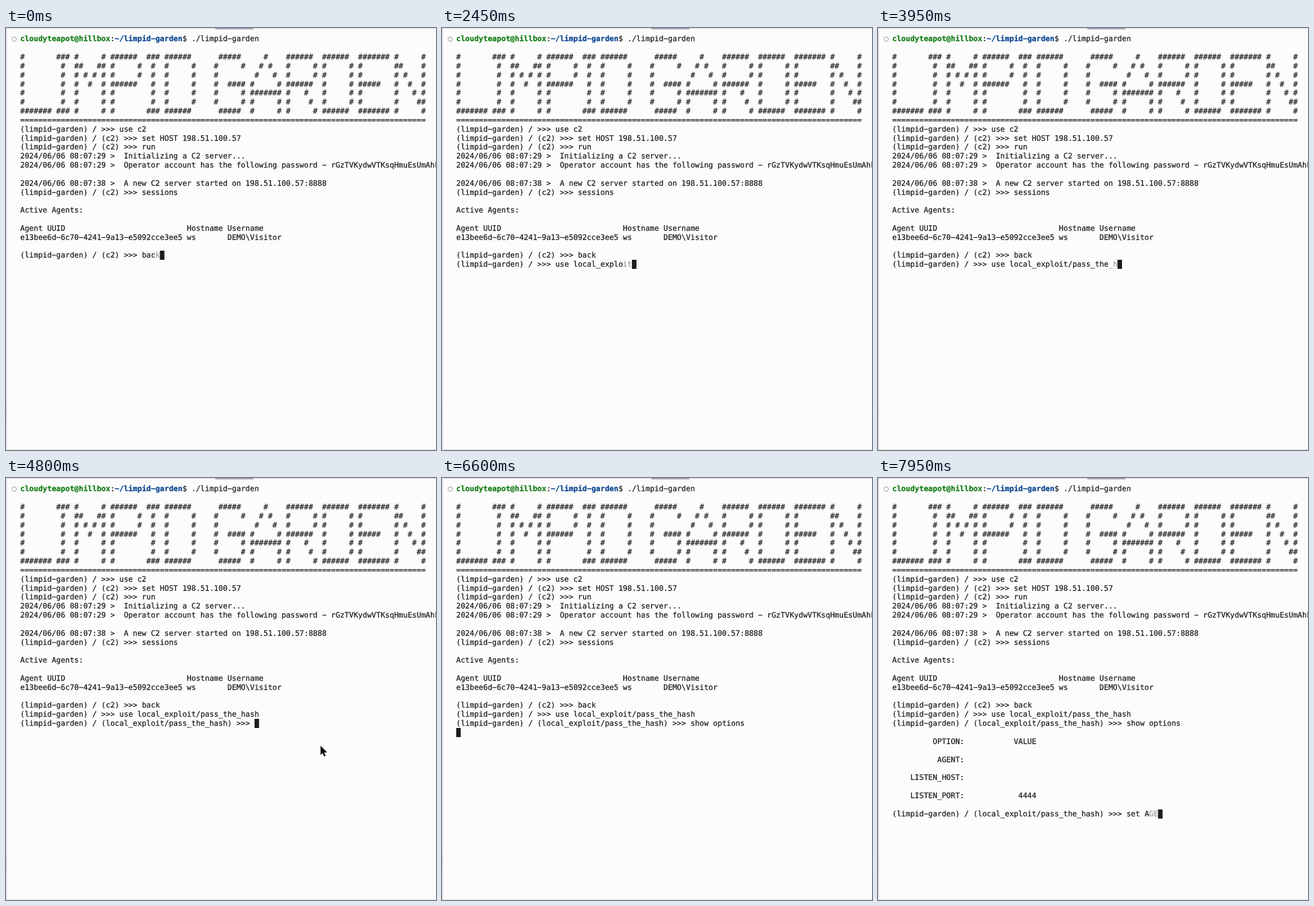
Animation, 756 px wide and 741 px high, one loop 8 s. Source, as an HTML page with a canvas:

```html
<!DOCTYPE html>
<html lang="en">
<head>
<meta charset="utf-8">
<title>Terminal session</title>
<style>
  html, body { margin: 0; width: 100%; height: 100%; overflow: hidden; background: #fcfcfc; }
  canvas { display: block; }
</style>
</head>
<body>
<canvas id="stage" width="756" height="741"></canvas>
<script>
const ctx = document.getElementById("stage").getContext("2d");
const LOOP = 8000, STEP = 50;
const LEFT = 25, BASELINE = 23.8, CELL = 7.922, LINE = 15.84;
const FONT = '13.16px "DejaVu Sans Mono", monospace';
const INK = "#1c1c1e", DIM = "#9b9b9b", GREEN = "#107c10", BLUE = "#0a4490";
const ECHO_DELAY = 125; // a typed key stays dim until it is confirmed

const APP = "limpid-garden", HOST = "198.51.100.57", MODULE = "local_exploit/pass_the_hash";
const prompt = module => `(${APP}) / ${module ? `(${module}) ` : ""}>>> `;
const columnX = col => LEFT + col * CELL;
const baselineY = row => Math.floor(BASELINE + row * LINE);

const GLYPHS = {
  L: "#/#/#/#/#/#/#######",
  I: "###/ # / # / # / # / # /###",
  M: "#     #/##   ##/# # # #/#  #  #/#     #/#     #/#     #",
  P: "######/#     #/#     #/######/#/#/#",
  D: "######/#     #/#     #/#     #/#     #/#     #/######",
  G: " #####/#     #/#/#  ####/#     #/#     #/ #####",
  A: "   #/  # #/ #   #/#     #/#######/#     #/#     #",
  R: "######/#     #/#     #/######/#   #/#    #/#     #",
  E: "#######/#/#/#####/#/#/#######",
  N: "#     #/##    #/# #   #/#  #  #/#   # #/#    ##/#     #",
  "-": "  /  /  /  /  /  /  "
};

const bannerRow = row => [...APP.toUpperCase()].map(letter =>
  GLYPHS[letter].split("/")[row].padEnd(letter === "I" ? 3 : letter === "-" ? 2 : 7)).join(" ");

const history = [
  "", "",
  ...[0, 1, 2, 3, 4, 5, 6].map(bannerRow),
  "=".repeat(90),
  prompt() + "use c2",
  prompt("c2") + "set HOST " + HOST,
  prompt("c2") + "run",
  "2024/06/06 08:07:29 >  Initializing a C2 server...",
  "2024/06/06 08:07:29 >  Operator account has the following password - rGzTVKydwVTKsqHmuEsUmAhkRw",
  "",
  `2024/06/06 08:07:38 >  A new C2 server started on ${HOST}:8888`,
  prompt("c2") + "sessions",
  "",
  "Active Agents:",
  "",
  "Agent UUID".padEnd(37) + "Hostname Username",
  "e13bee6d-6c70-4241-9a13-e5092cce3ee5 ws       DEMO\\Visitor"
];

const options = [["OPTION", "VALUE"], ["AGENT", ""], ["LISTEN_HOST", ""], ["LISTEN_PORT", "4444"]];
const OPTIONS_ROW = 28, OPTIONS_AT = 6800;

// caretAt: caret reaches the row; promptAt: prompt is printed;
// keys: [text, time of first key, time of last key]
const inputs = [
  { row: 24, caretAt: -1000, promptAt: -1000, prompt: prompt("c2"),
    keys: [["bac", -600, -300], ["k", -80, -80]] },
  { row: 25, caretAt: 50, promptAt: 300, prompt: prompt(),
    keys: [["use loca", 1050, 1350], ["l_", 1450, 1550], ["exploit/", 1850, 2520],
           ["pass", 2750, 2870], ["_the", 3180, 3510], ["_hash", 3850, 4120]] },
  { row: 26, caretAt: 4400, promptAt: 4550, prompt: prompt(MODULE),
    keys: [["show options", 5650, 6320]] },
  { row: 27, caretAt: 6500, promptAt: 6500, prompt: "", keys: [] },
  { row: 36, caretAt: OPTIONS_AT, promptAt: OPTIONS_AT, prompt: prompt(MODULE),
    keys: [["set A", 7350, 7570], ["GE", 7900, 7950]] }
];

const POINTER = { from: [553, 470], to: [417, 506], start: 4800, stop: 5150, hide: 5450 };
const ARROW = [[0, 0], [0, 16.5], [3.7, 13], [6.3, 19], [9, 17.8], [6.5, 12], [11.6, 11.8]];

function write(text, col, row, color = INK, weight = "") {
  // the terminal face has a wide hyphen and slightly heavy strokes
  const args = [text.replaceAll("-", "\u2212"), columnX(col), baselineY(row)];
  ctx.font = `${weight} ${FONT}`;
  ctx.textRendering = "geometricPrecision";
  ctx.fillStyle = ctx.strokeStyle = color;
  ctx.lineWidth = 0.25;
  ctx.fillText(...args);
  ctx.strokeText(...args);
}

function fill(color, x, y, w, h) {
  ctx.fillStyle = color;
  ctx.fillRect(x, y, w, h);
}

function drawFrame() {
  fill("#fcfcfc", 0, 0, 756, 741);
  fill("#d9d3e2", 0, 0, 756, 1);
  fill("#66586f", 368, 1, 67, 1);
  fill("#e5e3e8", 0, 1, 2, 740);
  fill("#cbc8ce", 0, 663, 1, 27);
  fill("#dedfd2", 0, 740, 756, 1);
  ctx.beginPath();
  ctx.arc(14.5, 19.5, 3.8, 0, 2 * Math.PI);
  ctx.strokeStyle = "#b0b0b0";
  ctx.lineWidth = 1.4;
  ctx.stroke();
}

function drawHistory() {
  write("cloudyteapot@hillbox", 0, 0, GREEN, "bold");
  write(":", 20, 0);
  write("~/" + APP, 21, 0, BLUE, "bold");
  write("$ ./" + APP, 36, 0);
  history.forEach((text, row) => write(text, 0, row));
}

function drawOptions() {
  options.forEach(([name, value], i) =>
    write((name + ":").padStart(16) + value.padStart(16), 0, OPTIONS_ROW + 2 * i));
}

// Draws one command line and returns the caret column.
function drawInput(input, time) {
  if (time < input.promptAt) return 0;
  write(input.prompt, 0, input.row);
  let col = input.prompt.length;
  for (const [text, first, last] of input.keys) {
    const gap = (last - first) / Math.max(1, text.length - 1);
    for (let i = 0; i < text.length; i++) {
      const age = time - (first + i * gap);
      if (age < -0.01) return col;
      write(text[i], col++, input.row, age < ECHO_DELAY ? DIM : INK);
    }
  }
  return col;
}

function drawPointer(time) {
  const { from, to, start, stop, hide } = POINTER;
  if (time < start || time >= hide) return;
  const p = Math.min(1, (time - start) / (stop - start));
  const eased = 1 - (1 - p) ** 2;
  const [x, y] = from.map((v, i) => v + (to[i] - v) * eased);
  ctx.beginPath();
  ARROW.forEach(([dx, dy]) => ctx.lineTo(x + dx, y + dy));
  ctx.closePath();
  ctx.lineJoin = "round";
  ctx.lineWidth = 2;
  ctx.strokeStyle = "#fff";
  ctx.stroke();
  ctx.fillStyle = "#111";
  ctx.fill();
}

function render() {
  const time = Math.floor(performance.now() % LOOP / STEP) * STEP;
  drawFrame();
  drawHistory();
  if (time >= OPTIONS_AT) drawOptions();
  let caret;
  for (const input of inputs) {
    if (time >= input.caretAt) caret = { row: input.row, col: drawInput(input, time) };
  }
  fill(INK, columnX(caret.col), baselineY(caret.row) - 12, CELL, 16);
  drawPointer(time);
  requestAnimationFrame(render);
}

render();
</script>
</body>
</html>
```
